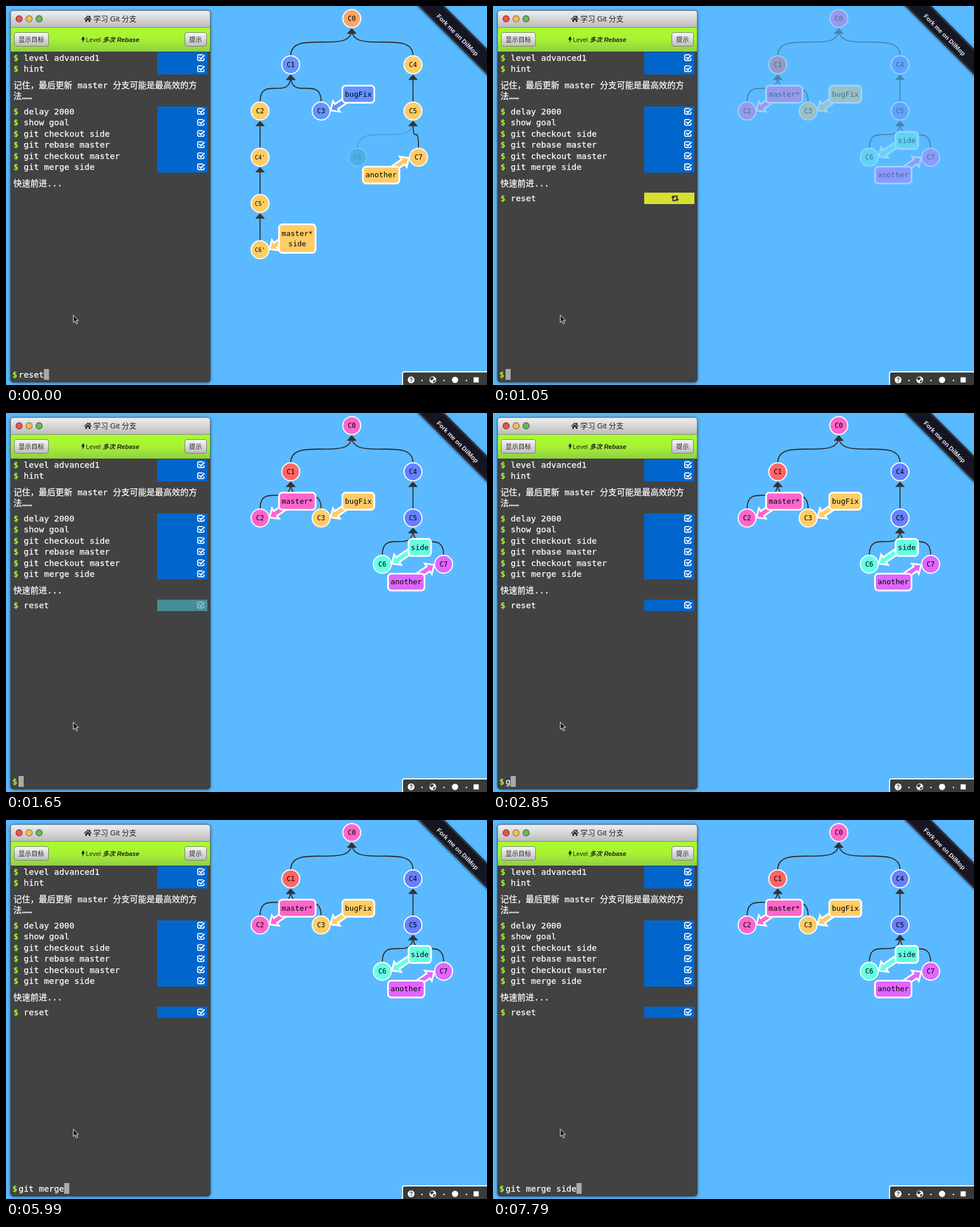
These frames come from a looping animation (843x664 px, 8 s). An HTML page:

```html
<!DOCTYPE html>
<html lang="zh">
<head>
<meta charset="utf-8">
<style>
html, body { margin: 0; width: 100%; height: 100%; overflow: hidden; background: #5bbaff; }
svg { display: block; width: 843px; height: 664px; }
text { white-space: pre; }
.mono { font: 14.75px "DejaVu Sans Mono", "Noto Sans CJK SC", "Noto Sans CJK", monospace; fill: #fff; }
.mono text, text.mono { stroke: #fff; stroke-width: .25px; }
.mono text.dollar, text.dollar { font-weight: bold; fill: #a6fa30; stroke: none; }
.ui { font: 11.2px "Liberation Sans", "Noto Sans CJK SC", "Noto Sans CJK", sans-serif; fill: #222; }
.tree { font-family: "DejaVu Sans Mono", monospace; text-anchor: middle; }
</style>
</head>
<body>
<svg viewBox="0 0 843 664">
  <defs>
    <linearGradient id="bar" x2="0" y2="1"><stop stop-color="#f0f0f0"/><stop offset="1" stop-color="#bdbdbd"/></linearGradient>
    <linearGradient id="green" x2="0" y2="1"><stop stop-color="#a9fb2d"/><stop offset=".45" stop-color="#a8f432"/><stop offset="1" stop-color="#8fd043"/></linearGradient>
    <linearGradient id="button" x2="0" y2="1"><stop stop-color="#f8f8f8"/><stop offset="1" stop-color="#bcbcbc"/></linearGradient>
    <filter id="shadow" x="-10%" y="-10%" width="120%" height="120%"><feDropShadow dx="0" dy="1" stdDeviation="3" flood-opacity=".5"/></filter>
    <g id="check" fill="none" stroke="#fff" stroke-width="1.8">
      <path d="M5 1V3Q5 5 3 5H-4Q-6 5 -6 3V-3Q-6 -5 -4 -5H3"/>
      <path d="M-3.5 -1L-.5 2L6 -4.5" stroke-width="2.3"/>
    </g>
    <g id="swap">
      <path d="M-3.5 -2V4H1.5M3.5 2V-4H-1.5" fill="none" stroke="#333" stroke-width="2.2"/>
      <path d="M-7 -1L-3.5 -5.5L0 -1ZM7 1L3.5 5.5L0 1Z" fill="#333"/>
    </g>
  </defs>
  <rect width="843" height="664" fill="#5bbaff"/>
  <g id="oldTree" class="tree"></g>
  <g id="newTree" class="tree"></g>

  <rect x="8" y="8" width="350" height="651" rx="5" fill="#424242" filter="url(#shadow)"/>
  <path d="M8 37V13Q8 8 13 8H353Q358 8 358 13V37Z" fill="url(#bar)"/>
  <path d="M8 37.5H358" stroke="#858585"/>
  <rect x="8" y="38" width="350" height="42" fill="url(#green)"/>
  <path d="M8 80.5H358" stroke="#333"/>
  <rect x="8" y="8" width="350" height="651" rx="5" fill="none" stroke="#2d2d2d" stroke-opacity=".6"/>
  <g stroke-width="1.3">
    <circle cx="23" cy="22.5" r="5.5" fill="#ee5350" stroke="#8f3533"/>
    <circle cx="40.5" cy="22.5" r="5.5" fill="#f5bd55" stroke="#94723a"/>
    <circle cx="58" cy="22.5" r="5.5" fill="#6cb85a" stroke="#406e36"/>
  </g>
  <path d="M136.5 23L143.5 16.5L146 18.8V17H148V20.6L150.5 23L149.3 24L143.5 18.7L137.7 24ZM139 24L143.5 20L148 24V28H145V25H142V28H139Z" fill="#333"/>
  <text class="ui" x="153" y="27" style="font-size:13px">学习 Git 分支</text>
  <g fill="url(#button)" stroke="#777">
    <rect x="14.5" y="46.5" width="60" height="24" rx="3.5"/>
    <rect x="313.5" y="46.5" width="38" height="24" rx="3.5"/>
  </g>
  <g class="ui" font-weight="500">
    <text x="22" y="63">显示目标</text>
    <text x="321" y="63">提示</text>
  </g>
  <path d="M134 54H137L136 57L138.5 56.5L133.5 65L134.5 59L132 59.5Z" fill="#222"/>
  <text class="ui" x="140" y="63" style="font-size:11px">Level <tspan font-weight="bold" font-style="italic">多次 Rebase</tspan></text>

  <g id="log" class="mono"></g>
  <g id="reset" class="mono">
    <text x="13" y="342" class="dollar">$</text><text x="31" y="342">reset</text>
    <rect id="status" x="265" y="327" width="88" height="20"/>
    <use id="swapIcon" href="#swap" x="319" y="337"/>
    <use id="checkIcon" href="#check" x="342" y="336.5"/>
  </g>
  <text class="mono dollar" x="11" y="651">$</text>
  <text id="typed" class="mono" x="22" y="651"></text>
  <rect id="caret" y="636" width="9" height="19" fill="#aaa"/>
  <path d="M118 541.5V554.5L121 551.7L123.2 557L125.4 556L123.1 551H127.2Z" fill="#111" stroke="#fff"/>

  <g transform="translate(793 49) rotate(45)">
    <rect x="-120" y="-17" width="240" height="32" fill="#141721" filter="url(#shadow)"/>
    <path d="M-120 -15H120M-120 13H120" stroke="#6c7078" stroke-width=".8"/>
    <text y="6" text-anchor="middle" style="font:bold 10.9px 'Liberation Sans',sans-serif" fill="#e4e7ee">Fork me on DilMop</text>
  </g>

  <path d="M695 668V645Q695 641 699 641H848V668Z" fill="#3a3a3a" stroke="#fff" stroke-width="1.8"/>
  <g fill="#fff">
    <circle cx="710" cy="655" r="6"/>
    <circle cx="748" cy="655" r="6"/>
    <path d="M744 651L748 650L750 653L746 656L743 654ZM749 656L753 655L751 659L748 660Z" fill="#3a3a3a"/>
    <circle cx="787" cy="655" r="5.5"/>
    <rect x="819.5" y="650.5" width="9" height="9"/>
    <circle cx="729" cy="656" r="1.3"/><circle cx="767.5" cy="656" r="1.3"/><circle cx="807" cy="656" r="1.3"/>
    <text x="710" y="658.5" text-anchor="middle" style="font:bold 10px 'Liberation Sans',sans-serif;fill:#3a3a3a">?</text>
  </g>
</svg>
<script>
const $ = id => document.getElementById(id);
const GOLD = '#ffcc66', BLUE = '#6693ff', PINK = '#ff66cc', INDIGO = '#6680ff', AQUA = '#66ffe3', VIOLET = '#e066ff';

// Curve from the top of a commit to an arrowhead under its parent
function edge([x, y], [px, py]) {
  const top = y - 16, tip = py + 17;
  return `<path d="M${x} ${top}C${x} ${top - 48} ${px} ${tip + 48} ${px} ${tip + 2}" fill="none" stroke="#2d2d2d" stroke-width="1.8"/>
    <path d="M${px} ${tip}L${px + 8.5} ${tip + 9.5}H${px - 8.5}Z" fill="#333"/>`;
}

function node([x, y, name, color]) {
  const size = name.length > 2 ? 10 : 11.7;
  return `<circle cx="${x}" cy="${y}" r="15.7" fill="${color}" stroke="#fff" stroke-width="2"/>
    <text x="${x}" y="${y + 4}" font-size="${size}">${name}</text>`;
}

// A branch tag: box, its lines of text and an arrow to the commit at (nx, ny)
function label([x, y, w, h, lines, color, nx, ny]) {
  const side = x > nx ? 1 : -1, angle = side > 0 ? -34 : 146;
  const cy = y + h / 2 + 4 - (lines.length - 1) * 9;
  return `<g fill="${color}" stroke="#fff" stroke-width="3">
    <path transform="translate(${nx + 16.5 * side} ${ny - side}) rotate(${angle})" d="M0 0L12.5 -11V-5H38V5H12.5V11Z"/>
    <rect x="${x}" y="${y}" width="${w}" height="${h}" rx="6"/></g>` +
    lines.map((s, i) => `<text x="${x + w / 2}" y="${cy + i * 18}" font-size="13">${s}</text>`).join('');
}

function tree(nodes, links, labels) {
  return links.map(([a, b]) => edge(nodes[a], nodes[b])).join('') +
    nodes.map(node).join('') + labels.map(label).join('');
}

$('oldTree').innerHTML =
  `<g opacity=".2">${edge([616, 265], [713.3, 184])}</g>
  <circle cx="616" cy="265" r="15.5" fill="#4eaee8" stroke="#6fc4f2" stroke-width="2"/>
  <text x="616" y="269" font-size="11.7" fill="#3f90c8">C6</text>` +
  tree([
    [606, 22, 'C0', '#ffa566'], [499, 103, 'C1', BLUE], [713.3, 103, 'C4', GOLD], [445.3, 184, 'C2', GOLD],
    [552.3, 184, 'C3', BLUE], [713.3, 184, 'C5', GOLD], [445.3, 265, "C4'", GOLD], [445.3, 346, "C5'", GOLD],
    [445.3, 427, "C6'", GOLD], [723, 265, 'C7', GOLD]
  ], [[1, 0], [2, 0], [3, 1], [4, 1], [5, 2], [6, 3], [7, 6], [8, 7], [9, 5]], [
    [589.5, 139.5, 56, 30, ['bugFix'], BLUE, 552.3, 184],
    [625.5, 281.5, 64, 29.5, ['another'], GOLD, 723, 265],
    [478.5, 382.5, 64, 50, ['master*', 'side'], GOLD, 445.3, 427]
  ]);

$('newTree').innerHTML = tree([
  [606, 22, 'C0', PINK], [499, 103, 'C1', '#ff6666'], [713.3, 103, 'C4', INDIGO], [445.3, 184, 'C2', PINK],
  [552.3, 184, 'C3', GOLD], [713.3, 184, 'C5', INDIGO], [659.5, 265, 'C6', AQUA], [767, 265, 'C7', VIOLET]
], [[1, 0], [2, 0], [3, 1], [4, 1], [5, 2], [6, 5], [7, 5]], [
  [478.5, 139.5, 64, 30, ['master*'], PINK, 445.3, 184],
  [589.5, 139.5, 56, 30, ['bugFix'], GOLD, 552.3, 184],
  [705.5, 220.5, 39.5, 30, ['side'], AQUA, 659.5, 265],
  [669.5, 281.5, 64, 29.5, ['another'], VIOLET, 767, 265]
]);

const commands = (y, list) => list.map((s, i) => {
  const cy = y + i * 19.45;
  return `<text x="13" y="${cy + 5}" class="dollar">$</text><text x="31" y="${cy + 5}">${s}</text><use href="#check" x="342" y="${cy - .5}"/>`;
}).join('');

$('log').innerHTML = '<path d="M265 81H353V120H265ZM265 176H353V292H265Z" fill="#0066cc"/>' +
  commands(91, ['level advanced1', 'hint']) +
  commands(185, ['delay 2000', 'show goal', 'git checkout side', 'git rebase master', 'git checkout master', 'git merge side']) +
  `<text x="13" y="143.5">记住，最后更新 master 分支可能是最高效的方</text>
   <text x="13" y="163">法……</text><text x="13" y="315.5">快速前进...</text>`;

// Each list holds [start time, value]; a value stays until the next start
const typing = [[0, 'reset'], [600, ''], [2850, 'g'], [3000, 'git'], [3450, 'git '], [3900, 'git m'],
  [4500, 'git mr'], [5400, 'git m'], [5540, 'git mer'], [5840, 'git merg'], [5990, 'git merge'],
  [6890, 'git merge '], [7190, 'git merge s'], [7340, 'git merge si'], [7490, 'git merge sid'], [7790, 'git merge side']];
const fade = [[0, 0], [1050, .38], [1200, .85], [1350, 1]];
const done = [[0, 0], [1050, .08], [1200, .2], [1350, .36], [1500, .53], [1650, .7], [1800, .94], [2250, 1]];
const tick = [[0, 0], [1500, .25], [1650, .45], [1800, .8], [1950, .95], [2250, 1]];
const at = (steps, t) => steps.findLast(s => s[0] <= t)[1];
const mix = (a, b, p) => `rgb(${a.map((v, i) => Math.round(v + (b[i] - v) * p))})`;

function draw(now) {
  const t = now % 8000, text = at(typing, t), p = at(done, t);
  $('typed').textContent = text;
  $('caret').setAttribute('x', 22 + text.length * 8.88);
  $('oldTree').style.display = t < 1050 ? '' : 'none';
  $('newTree').style.opacity = at(fade, t);
  $('reset').style.display = t < 600 ? 'none' : '';
  $('status').style.fill = mix([235, 235, 36], [0, 102, 204], p);
  $('swapIcon').style.display = t < 1500 ? '' : 'none';
  $('checkIcon').style.opacity = at(tick, t);
  requestAnimationFrame(draw);
}
requestAnimationFrame(draw);
</script>
</body>
</html>
```
